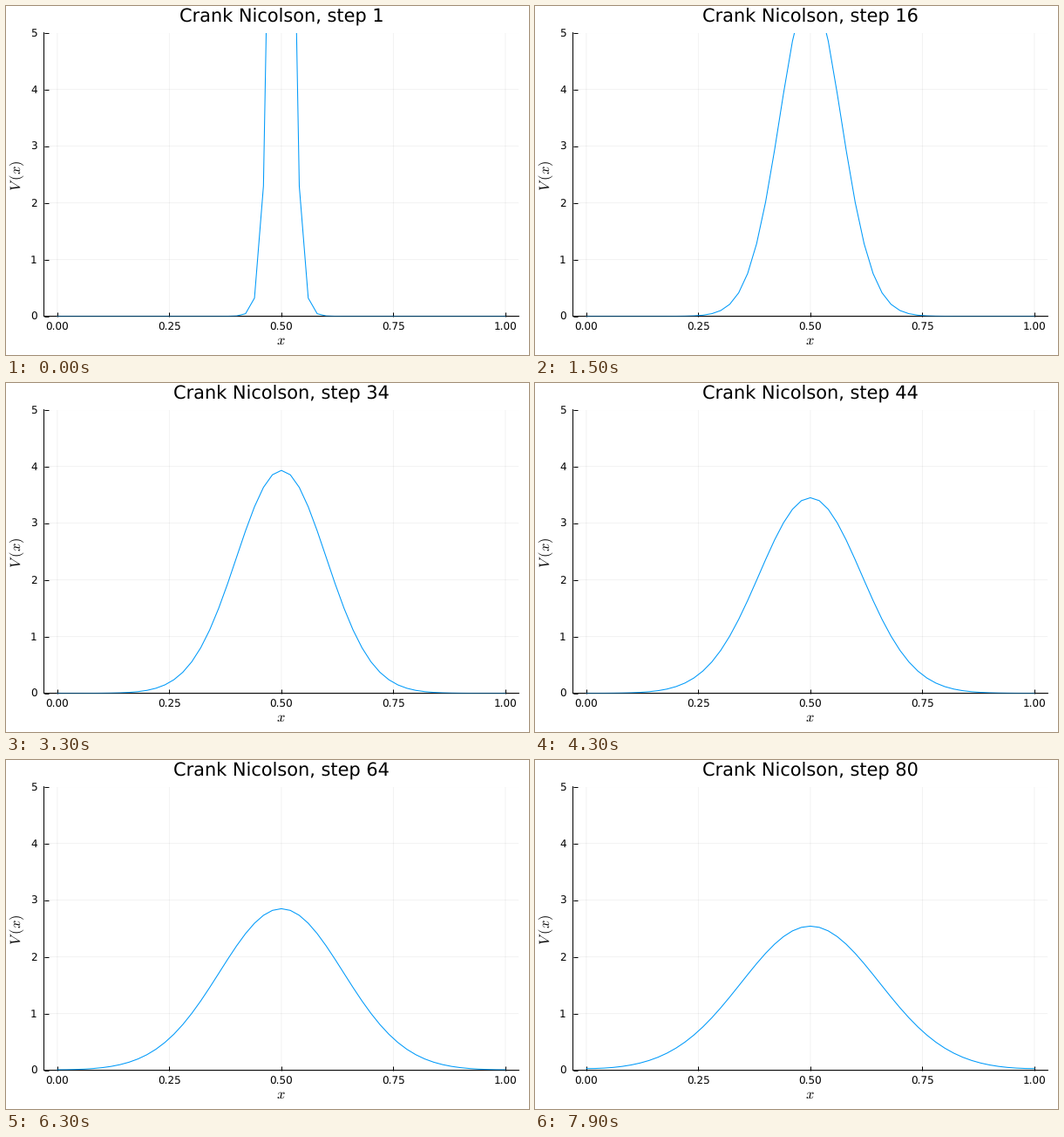
Write a matplotlib script that moves like this. It is 600 px wide and 400 px high and loops after 8 s.

```python
import numpy as np
import matplotlib.pyplot as plt
from matplotlib.animation import FuncAnimation

W, H, DPI = 600, 400, 100
PX = 72 / DPI                      # one pixel in points
STEPS, INTERVAL = 80, 100
LEFT, RIGHT, TOP, BOTTOM = 43.5, 588.3, 30.6, 355.6
BLUE = "#009AFA"

plt.rcParams.update({
    "font.family": "DejaVu Sans",
    "mathtext.fontset": "cm",
    "text.hinting": "none",
})


def solve(n=51, r=0.375, leak=1.7e-4, spread=0.01):
    """Crank-Nicolson diffusion of a narrow pulse with reflecting ends."""
    x = np.linspace(0, 1, n)
    v = np.exp(-(x - 0.5) ** 2 / (2 * spread ** 2))
    v /= v.sum() * (x[1] - x[0])
    lap = np.diag(np.full(n, -2.0)) + np.eye(n, k=1) + np.eye(n, k=-1)
    lap[0, 1] = lap[-1, -2] = 2
    half = (r * lap - leak * np.eye(n)) / 2
    step = np.linalg.solve(np.eye(n) - half, np.eye(n) + half)
    rows = []
    for _ in range(STEPS):
        v = step @ v
        rows.append(v)
    return x, rows


x, rows = solve()

fig = plt.figure(figsize=(W / DPI, H / DPI), dpi=DPI, facecolor="white")
ax = fig.add_axes([LEFT / W, 1 - BOTTOM / H, (RIGHT - LEFT) / W, (BOTTOM - TOP) / H])
ax.set(xlim=(-0.03, 1.03), ylim=(0, 5))
ax.set_xticks(np.linspace(0, 1, 5), labels=[])
ax.set_yticks(range(6), labels=[])
ax.tick_params(direction="in", length=5 * PX, width=PX)
ax.grid(color="black", alpha=0.05, linewidth=PX, snap=False)
ax.set_axisbelow(True)
for side in ("top", "right"):
    ax.spines[side].set_visible(False)
for side in ("left", "bottom"):
    ax.spines[side].set(linewidth=PX, zorder=2, snap=False)
for line in ax.get_xticklines() + ax.get_yticklines():
    line.set_snap(False)


def label(px, py, text, size, ha="center", **kw):
    return fig.text(px / W, 1 - py / H, text, fontsize=size * PX,
                    ha=ha, va="baseline", **kw)


for t in np.linspace(0, 1, 5):
    label(LEFT + (t + 0.03) / 1.06 * (RIGHT - LEFT), 372, f"{t:.2f}", 12)
for t in range(6):
    label(35.8, BOTTOM - t * (BOTTOM - TOP) / 5 + 4.3, str(t), 12, ha="right")
label(315.7, 388, "$x$", 16.5)
label(16.4, 194, r"$V\hspace{0.22}(x)$", 16.5, rotation=90, rotation_mode="anchor")
title = label(316, 19, "", 20.9)

curve, = ax.plot(x, rows[0], color=BLUE, linewidth=1.05 * PX, zorder=3)
# the curve is half hidden where it runs along the bottom axis
ax.plot([0, 1], [0, 0], transform=ax.transAxes, color="black", alpha=0.6,
        linewidth=PX, zorder=4, clip_on=False, snap=False)


def update(i):
    curve.set_ydata(rows[i])
    title.set_text(f"Crank Nicolson, step {i + 1}")
    return curve, title


anim = FuncAnimation(fig, update, frames=STEPS, interval=INTERVAL,
                     repeat=True, repeat_delay=0, blit=False)
plt.show()
```
